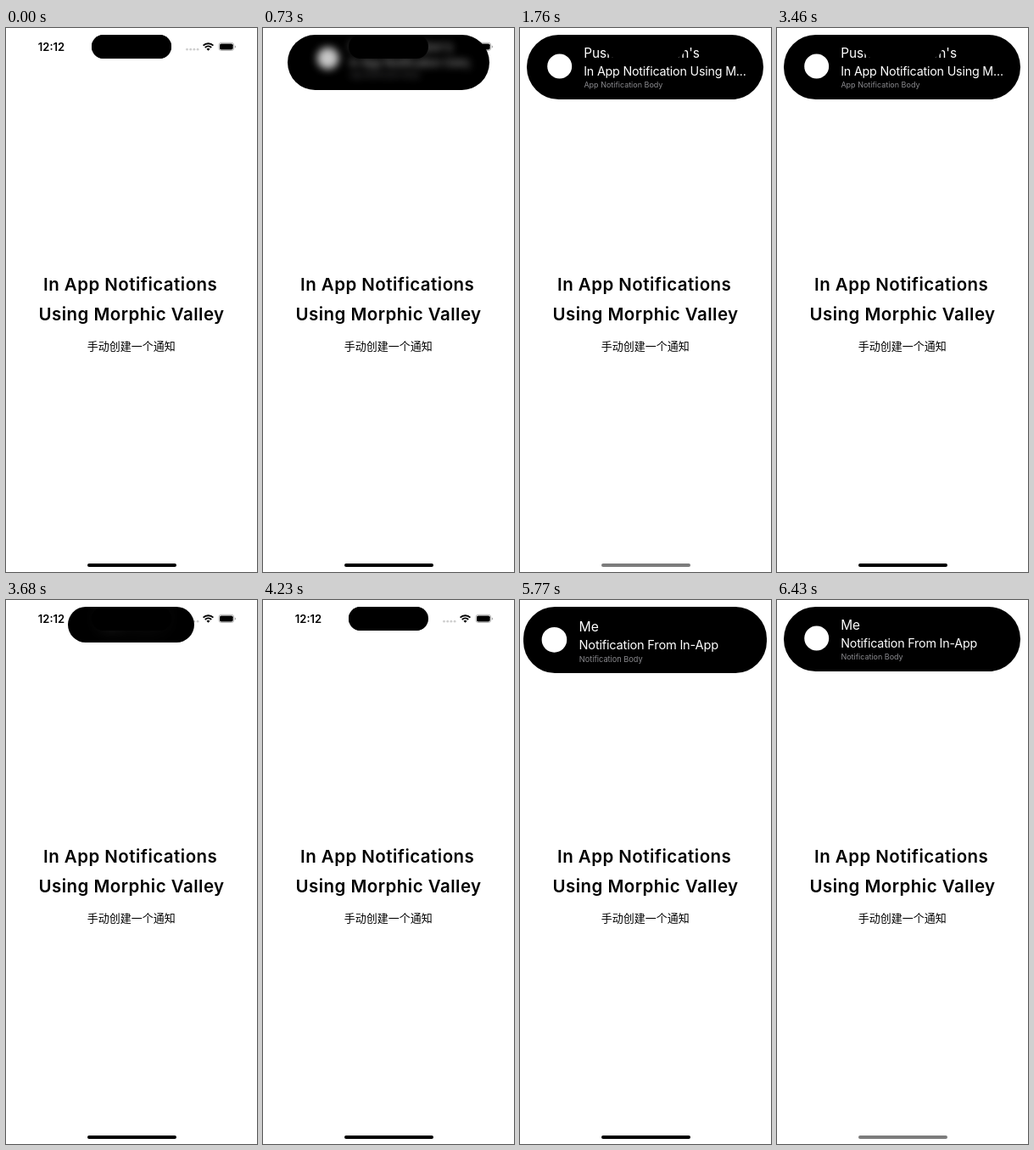
Write an HTML page that moves like this. It is 296 by 640 pixels and loops after 8 s.

```html
<!DOCTYPE html>
<html lang="en">
<head>
<meta charset="utf-8">
<title>In App Notifications</title>
<style>
  html, body { margin: 0; width: 100%; height: 100%; overflow: hidden; background: #fff; }
  #stage { position: relative; width: 296px; height: 640px; overflow: hidden; background: #fff; }
  svg { display: block; }
  text { font-family: Inter, "Liberation Sans", sans-serif; }
  .screen { position: absolute; left: 0; top: 0; }
  .time { font-size: 13px; font-weight: 600; }
  .heading { font-size: 20.5px; font-weight: 600; letter-spacing: .47px; }
  .link { font: 13px "Noto Sans CJK SC", "Noto Sans CJK", sans-serif; }

  #pill { position: absolute; top: 8.3px; background: #000; overflow: hidden; }
  #content { position: absolute; inset: 0; transform-origin: 50% 0; }
  #content svg { position: absolute; left: 0; top: 50%; width: calc(100% - 12px); height: 76px; margin-top: -38px; }
  #content text { fill: #fff; }
  .title { font-size: 15.4px; }
  .subtitle { font-size: 14.3px; letter-spacing: -.2px; }
  #content .body { font-size: 9px; fill: #8a8a8e; }

  #island { position: absolute; left: 100.5px; top: 8.3px; width: 94.5px; height: 28px; border-radius: 14px; background: #000; }
  #home { position: absolute; left: 95.5px; top: 630px; width: 105px; height: 4px; border-radius: 2px; }
</style>
</head>
<body>
<div id="stage">
  <svg class="screen" width="296" height="640">
    <text class="time" x="37.8" y="26.6">12:12</text>
    <g fill="#cfcfcf">
      <circle cx="213.5" cy="25.2" r="1.4"/>
      <circle cx="217.7" cy="25.2" r="1.4"/>
      <circle cx="221.9" cy="25.2" r="1.4"/>
      <circle cx="226.1" cy="25.2" r="1.4"/>
    </g>
    <g fill="none" stroke="#000" stroke-width="1.9">
      <path d="M232.6 20.6a8.4 8.4 0 0 1 11.8 0"/>
      <path d="M234.8 23a5.3 5.3 0 0 1 7.4 0"/>
    </g>
    <path d="M236.5 24.7a2.9 2.9 0 0 1 4 0l-2 2.1z"/>
    <rect x="250.9" y="17.3" width="17.9" height="9.2" rx="3" fill="none" stroke="#a8a8a8" stroke-width=".8"/>
    <rect x="252" y="18.4" width="15.7" height="7" rx="1.9"/>
    <path d="M269.9 20.4q1.3.5 1.3 1.5t-1.3 1.5z" fill="#a8a8a8"/>

    <text class="heading" x="44" y="309">In App Notifications</text>
    <text class="heading" x="38.4" y="343.5">Using Morphic Valley</text>
    <text class="link" x="95.8" y="379" lang="zh-CN">手动创建一个通知</text>
  </svg>

  <div id="pill">
    <div id="content">
      <svg>
        <circle cx="38.7" cy="37" r="14.5" fill="#fff"/>
        <g id="push">
          <text class="title" x="67.2" y="27.4">Push Notification's</text>
          <text class="subtitle" x="67.2" y="48">In App Notification Using M...</text>
          <text class="body" x="67.4" y="62.4">App Notification Body</text>
        </g>
        <g id="local">
          <text class="title" x="67.2" y="27.4">Me</text>
          <text class="subtitle" x="67.2" y="48">Notification From In-App</text>
          <text class="body" x="67.4" y="62.4">Notification Body</text>
        </g>
      </svg>
    </div>
  </div>
  <div id="island"></div>
  <div id="home"></div>
</div>
<script>
  const LOOP = 8000, OPEN = 490, CLOSE = 3465, REOPEN = 5237;
  const [pill, content, push, local, home] =
    ['pill', 'content', 'push', 'local', 'home'].map(id => document.getElementById(id));

  const mix = (a, b, p) => a + (b - a) * p;
  const clamp = v => Math.min(1, Math.max(0, v));

  // Underdamped spring: response 0.7 s, damping fraction 0.7.
  function spring(ms) {
    if (ms <= 0) return 0;
    const s = ms / 1000, zeta = 0.7, omega = 2 * Math.PI / 0.7;
    const decay = zeta * omega, freq = omega * Math.sqrt(1 - zeta * zeta);
    return 1 - Math.exp(-decay * s) * (Math.cos(freq * s) + decay / freq * Math.sin(freq * s));
  }

  function openness(t) {
    if (t < CLOSE) return spring(t - OPEN);
    if (t < REOPEN) return 1 - spring(t - CLOSE);
    return spring(t - REOPEN);
  }

  // The home indicator dims after each opening and snaps back on closing.
  function dimming(t) {
    if (t < 3460) return clamp((t - 1300) / 460);
    return clamp((t - 5980) / 450);
  }

  function draw(t) {
    const p = openness(t), shown = clamp(p);
    const width = mix(94.5, 279.4, p);
    pill.style.width = width + 'px';
    pill.style.left = 147.8 - width / 2 + 'px';
    pill.style.height = mix(28, 75.3, p) + 'px';
    pill.style.borderRadius = mix(47.4, 37.7, p) + 'px';

    const blur = 24 * (1 - shown);
    content.style.opacity = shown;
    content.style.filter = blur > 0.02 ? `blur(${blur}px)` : 'none';
    content.style.transform = `scale(${mix(0.5, 1, p)})`;

    const second = t >= 5000;
    push.style.display = second ? 'none' : '';
    local.style.display = second ? '' : 'none';

    const grey = Math.round(124 * dimming(t));
    home.style.background = `rgb(${grey}, ${grey}, ${grey})`;
  }

  const start = performance.now();
  function tick() {
    draw((performance.now() - start) % LOOP);
    requestAnimationFrame(tick);
  }
  tick();
</script>
</body>
</html>
```
